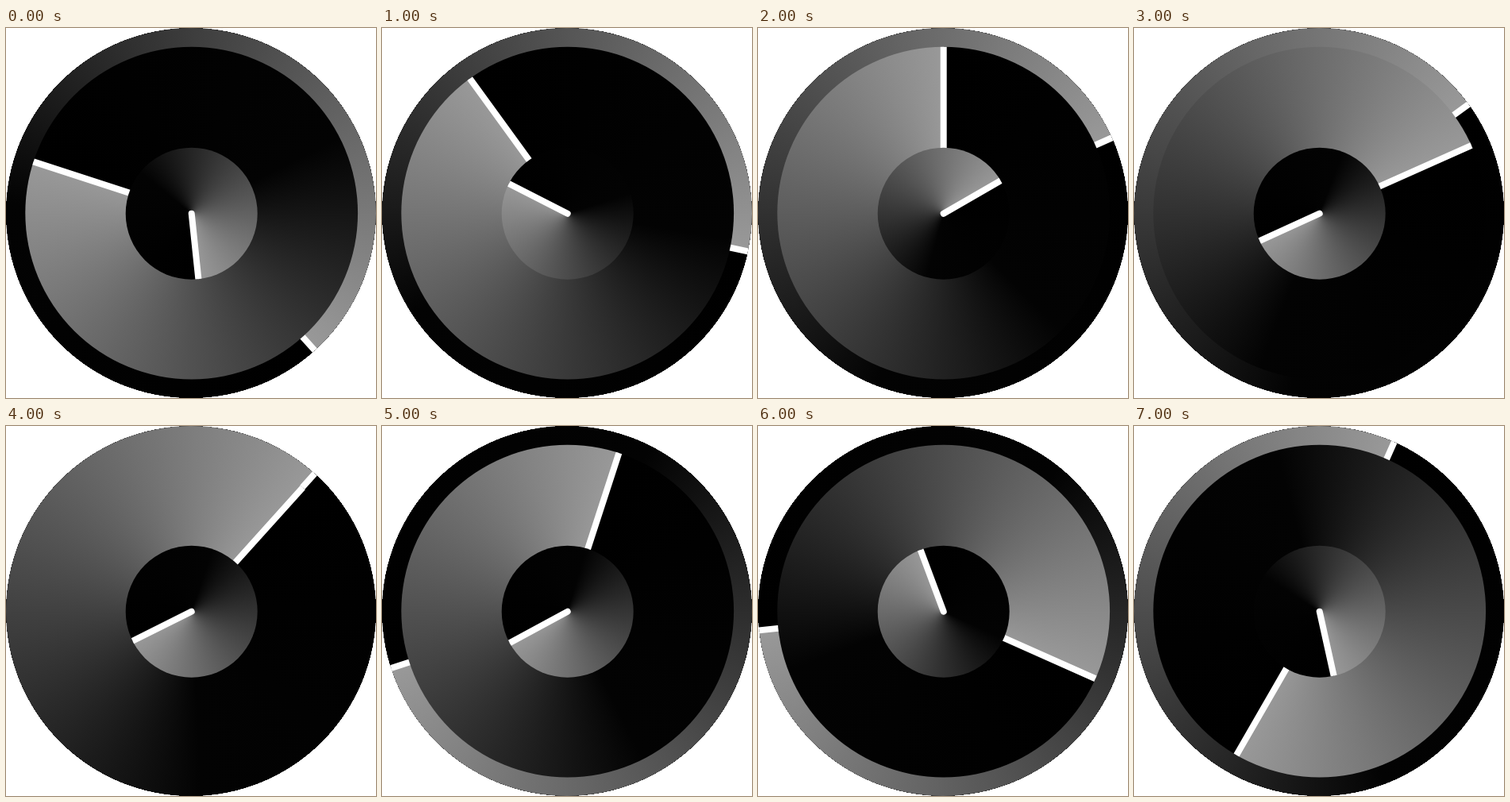
These frames come from a looping animation (466 by 466 pixels, 8000 ms). An HTML page with a canvas:

```html
<!DOCTYPE html>
<html lang="en">
<head>
<meta charset="utf-8">
<title>Radial clock</title>
<style>
  html, body { margin: 0; width: 100%; height: 100%; overflow: hidden; background: #fff; }
  canvas { display: block; }
</style>
</head>
<body>
<canvas id="clock" width="466" height="466"></canvas>
<script>
const ctx = document.getElementById('clock').getContext('2d');
const SIZE = 466;
const TAIL = 225 / 360;
const STEP = 1000;
const DISCS = {
  second: { x: 233, y: 233, r: 233 },
  minute: { x: 233.7, y: 233.1, r: 209.4 },
  hour: { x: 233.7, y: 233.7, r: 83 }
};

// hour, minute, second
const TIMES = [
  [5, 48, 23], [9, 54, 17], [2, 0, 11], [8, 11, 9],
  [8, 7, 7], [8, 3, 42], [11, 19, 44], [5, 35, 4]
];

// Black backing with a hard, stepped edge.
function drawBacking({ x, r }) {
  ctx.fillStyle = '#000';
  for (let row = 0; row < SIZE; row++) {
    const half = Math.round(Math.sqrt(r * r - (row + 0.5 - r) ** 2));
    ctx.fillRect(x - half, row, 2 * half, 1);
  }
}

// A disc with a white hand and a grey tail fading out behind it.
function drawDisc({ x, y, r }, degrees) {
  const angle = (degrees - 90) * Math.PI / 180;
  const shade = ctx.createConicGradient(angle, x, y);
  shade.addColorStop(0, '#000');
  shade.addColorStop(1 - TAIL, '#030303');
  shade.addColorStop(1, '#999');

  ctx.save();
  ctx.beginPath();
  ctx.arc(x, y, r, 0, 2 * Math.PI);
  ctx.fillStyle = shade;
  ctx.fill();
  ctx.clip();

  ctx.beginPath();
  ctx.moveTo(x, y);
  ctx.lineTo(x + r * Math.cos(angle), y + r * Math.sin(angle));
  ctx.lineWidth = 8;
  ctx.lineCap = 'round';
  ctx.strokeStyle = '#fff';
  ctx.stroke();
  ctx.restore();
}

function drawClock([h, m, s]) {
  ctx.clearRect(0, 0, SIZE, SIZE);
  drawBacking(DISCS.second);
  drawDisc(DISCS.second, s * 6);
  drawDisc(DISCS.minute, m * 6);
  drawDisc(DISCS.hour, h * 30 + m / 2);
}

let shown = -1;
const start = performance.now();

function tick() {
  const elapsed = Math.max(0, performance.now() - start);
  const index = Math.floor(elapsed / STEP) % TIMES.length;
  if (index !== shown) drawClock(TIMES[shown = index]);
  requestAnimationFrame(tick);
}
tick();
</script>
</body>
</html>
```
